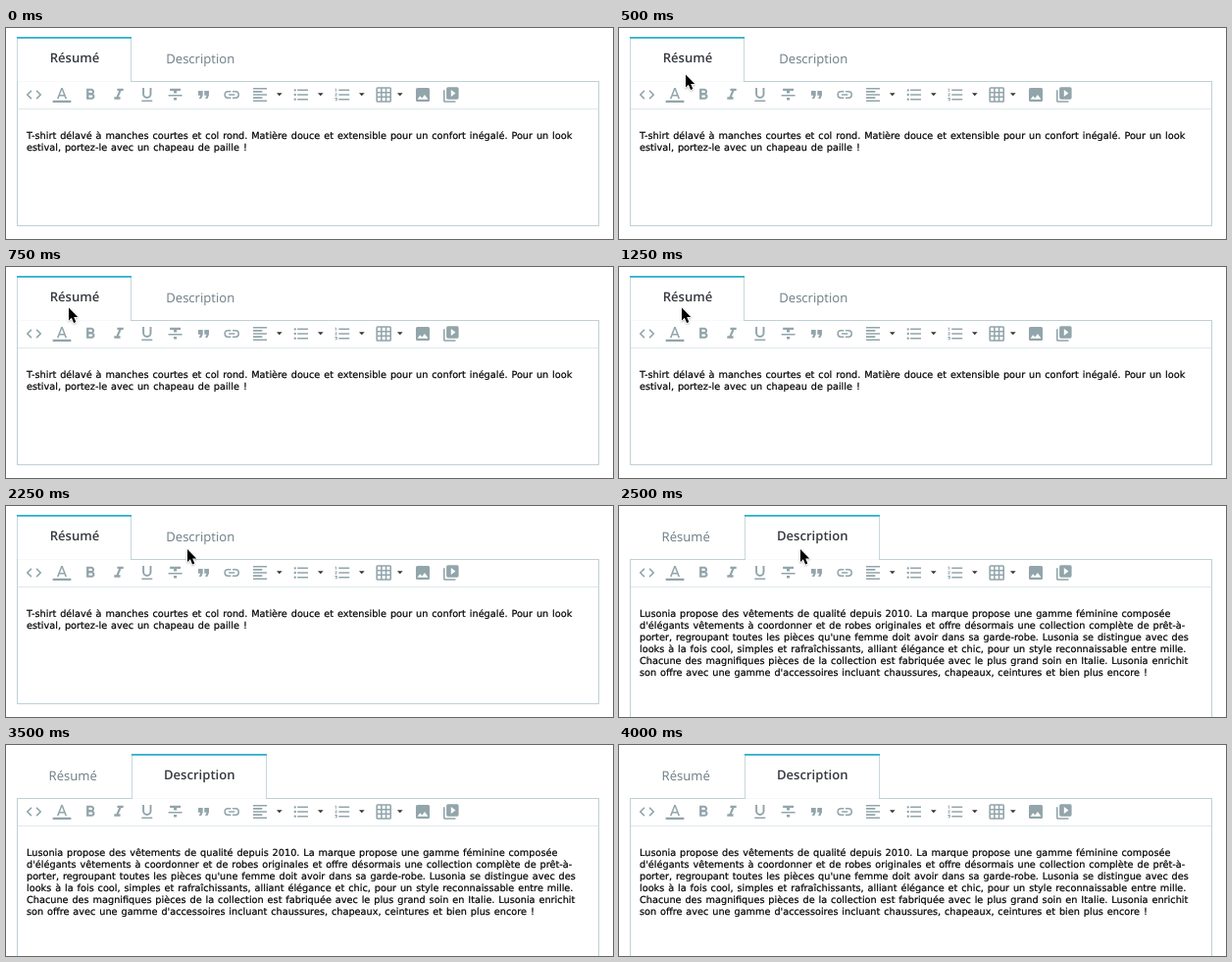
Animation, 619 px wide and 215 px high, one loop 4500 ms. Source, as an HTML page with a canvas:

```html
<!DOCTYPE html>
<html lang="fr">
<head>
<meta charset="utf-8">
<title>Éditeur à onglets</title>
<style>
  html, body { margin: 0; width: 100%; height: 100%; overflow: hidden; background: #fff; }
  canvas { display: block; width: 619px; height: 215px; }
</style>
</head>
<body>
<canvas id="stage"></canvas>
<script>
const W = 619, H = 215, LOOP = 4500, SWITCH = 2500;
const canvas = document.getElementById('stage');
const ctx = canvas.getContext('2d');
const dpr = window.devicePixelRatio || 1;
canvas.width = W * dpr;
canvas.height = H * dpr;

const BORDER = '#bfd0d5', TAB_BORDER = '#c8d8dd', ACCENT = '#2fb0cb', ICON = '#92a5ab';

const TABS = [
  { label: 'Résumé', x: 11, w: 117, on: 70, off: 68.2 },
  { label: 'Description', x: 128, w: 138, on: 197.2, off: 198.2 }
];

const TEXTS = [
  [
    'T-shirt délavé à manches courtes et col rond. Matière douce et extensible pour un confort inégalé. Pour un look',
    'estival, portez-le avec un chapeau de paille !'
  ],
  [
    'Lusonia propose des vêtements de qualité depuis 2010. La marque propose une gamme féminine composée',
    "d'élégants vêtements à coordonner et de robes originales et offre désormais une collection complète de prêt-à-",
    "porter, regroupant toutes les pièces qu'une femme doit avoir dans sa garde-robe. Lusonia se distingue avec des",
    'looks à la fois cool, simples et rafraîchissants, alliant élégance et chic, pour un style reconnaissable entre mille.',
    'Chacune des magnifiques pièces de la collection est fabriquée avec le plus grand soin en Italie. Lusonia enrichit',
    "son offre avec une gamme d'accessoires incluant chaussures, chapeaux, ceintures et bien plus encore !"
  ]
];

// Pointer steps: start time and tip position (none = hidden)
const POINTER = [
  { t: 0 },
  { t: 250, x: 151, y: 57.5 },
  { t: 500, x: 68, y: 47.5 },
  { t: 750, x: 64, y: 41.5 },
  { t: 1500, x: 132, y: 42.5 },
  { t: 1750, x: 185, y: 44 },
  { t: 3500 }
];

// Icons live on a 24-unit grid
const rects = list => list.map(([x, y, w, h]) => `M${x} ${y}h${w}v${h}h${-w}z`).join('');
const bars = rects([5, 11, 17].map(y => [7, y, 14, 2]));
const cells = rects([4, 10, 16].flatMap(y => [4, 10, 16].map(x => [x, y, 4, 4])));
const dots = [6, 12, 18].map(y => `M2.5 ${y}a1.5 1.5 0 1 0 3 0a1.5 1.5 0 1 0-3 0z`).join('');

const ICONS = [
  { x: 28.5, d: 'M9.4 16.6L4.8 12l4.6-4.6L8 6l-6 6 6 6zM14.6 16.6l4.6-4.6-4.6-4.6L16 6l6 6-6 6z' },
  { x: 57, d: 'M0 19.4h24v2.7H0zM11 3L5.5 17h2.25l1.12-3h6.25l1.12 3h2.25L13 3zM9.62 12L12 5.67 14.38 12z' },
  { x: 86, d: 'M15.6 10.8c1-.7 1.65-1.8 1.65-2.8 0-2.26-1.75-4-4-4H7v14h7c2.1 0 3.75-1.7 3.75-3.8 0-1.5-.86-2.8-2.15-3.4z' +
              'M10 6.5h3a1.5 1.5 0 0 1 0 3h-3zM10 12.5h3.5a1.5 1.5 0 0 1 0 3H10z' },
  { x: 115, d: 'M10 4v3h2.2l-3.4 8H6v3h8v-3h-2.2l3.4-8H18V4z' },
  { x: 143.8, d: 'M12 17a6 6 0 0 0 6-6V3h-2.5v8a3.5 3.5 0 0 1-7 0V3H6v8a6 6 0 0 0 6 6zM5 19h14v2H5z' },
  { x: 172.6, d: 'M10 19h4v-3h-4zM5 4v3h5v3h4V7h5V4zM3 14h18v-2H3z' },
  { x: 201.5, d: 'M6 17h3l2-4V7H5v6h3zM14 17h3l2-4V7h-6v6h3z' },
  { x: 230.2, d: 'M11 7H7a5 5 0 0 0 0 10h4v-1.9H7a3.1 3.1 0 0 1 0-6.2h4zM8 11h8v2H8z' +
                 'M13 7h4a5 5 0 0 1 0 10h-4v-1.9h4a3.1 3.1 0 0 0 0-6.2h-4z' },
  { x: 259, caret: 278.8, d: rects([3, 7, 11, 15, 19].map((y, i) => [3, y, i % 2 ? 12 : 18, 2])) },
  { x: 301, caret: 320.8, d: dots + bars },
  { x: 343.2, caret: 362.8, d: bars + 'M3 8h1V4H2v1h1zM2 11h1.8L2 13.1v.9h3v-1H3.2L5 10.9V10H2zM2 17h2v.5H3v1h1v.5H2v1h3v-4H2z' },
  { x: 385.2, caret: 401.8, d: 'M4 2h16q2 0 2 2v16q0 2-2 2H4q-2 0-2-2V4q0-2 2-2z' + cells },
  { x: 425, d: 'M5 3h14q2 0 2 2v14q0 2-2 2H5q-2 0-2-2V5q0-2 2-2zM8.5 13.5l2.5 3 3.5-4.5 4.5 6H5z' },
  { x: 453.8, d: 'M4 6H2v14q0 2 2 2h14v-2H4zM8 2h12q2 0 2 2v12q0 2-2 2H8q-2 0-2-2V4q0-2 2-2zM12 14.5v-9l6 4.5z' }
].map(icon => ({ ...icon, path: new Path2D(icon.d) }));

const ARROW = new Path2D('M0 0v13l2.9-2.8 2.2 5.2 2.2-.9-2.1-5H9.2z');

function rect(x, y, w, h, color) {
  ctx.fillStyle = color;
  ctx.fillRect(x, y, w, h);
}

function drawPanel(active) {
  const bottom = active ? H : 202;
  rect(11, 54, 594, 1, BORDER);
  rect(11, 54, 1, bottom - 54, BORDER);
  rect(604, 54, 1, bottom - 54, BORDER);
  rect(12, 82, 592, 1, '#e0e9eb');
  if (!active) rect(11, 201, 594, 1, BORDER);
}

function drawTabs(active) {
  ctx.textAlign = 'center';
  TABS.forEach((tab, i) => {
    const on = i === active;
    if (on) {
      rect(tab.x, 9, tab.w, 45, TAB_BORDER);
      rect(tab.x + 1, 10, tab.w - 2, 44, '#fff');
      rect(tab.x + 1, 54, tab.w - 2, 1, '#f6f9fa');
      rect(tab.x, 9, tab.w, 1.8, ACCENT);
    }
    ctx.font = `${on ? 600 : 400} 13.1px "Open Sans", sans-serif`;
    ctx.fillStyle = on ? '#363a41' : '#6c7d84';
    ctx.fillText(tab.label, on ? tab.on : tab.off, on ? 35 : 36);
  });
}

function drawToolbar() {
  const scale = 0.78;
  for (const { x, caret, path } of ICONS) {
    ctx.save();
    ctx.translate(x - 12 * scale, 68 - 12 * scale);
    ctx.scale(scale, scale);
    ctx.fillStyle = ICON;
    ctx.fill(path, 'evenodd');
    ctx.restore();
    if (caret) {
      ctx.fillStyle = '#333';
      ctx.beginPath();
      ctx.moveTo(caret - 2.8, 66.3);
      ctx.lineTo(caret + 2.8, 66.3);
      ctx.lineTo(caret, 69.3);
      ctx.fill();
    }
  }
}

function drawBody(lines) {
  ctx.textAlign = 'left';
  ctx.font = '9.72px Verdana, "DejaVu Sans", sans-serif';
  ctx.wordSpacing = '0.8px';
  ctx.fillStyle = ctx.strokeStyle = '#000';
  ctx.lineWidth = 0.2;
  lines.forEach((line, i) => {
    const y = 113 + i * 12;
    ctx.fillText(line, 21, y);
    ctx.strokeText(line, 21, y);
  });
  ctx.wordSpacing = '0px';
}

function drawPointer({ x, y }) {
  if (x === undefined) return;
  ctx.save();
  ctx.translate(x, y);
  ctx.lineJoin = 'round';
  ctx.shadowColor = 'rgba(0,0,0,.25)';
  ctx.shadowBlur = 2 * dpr;
  ctx.shadowOffsetY = dpr;
  ctx.strokeStyle = '#fff';
  ctx.lineWidth = 1.6;
  ctx.stroke(ARROW);
  ctx.shadowColor = 'transparent';
  ctx.fillStyle = '#000';
  ctx.fill(ARROW);
  ctx.restore();
}

function draw(now) {
  const t = now % LOOP;
  const active = t < SWITCH ? 0 : 1;
  ctx.setTransform(dpr, 0, 0, dpr, 0, 0);
  ctx.textRendering = 'geometricPrecision';
  rect(0, 0, W, H, '#fff');
  drawPanel(active);
  drawTabs(active);
  drawToolbar();
  drawBody(TEXTS[active]);
  drawPointer(POINTER.findLast(step => step.t <= t));
}

const start = performance.now();
function tick() {
  draw(performance.now() - start);
  requestAnimationFrame(tick);
}
tick();
</script>
</body>
</html>
```
